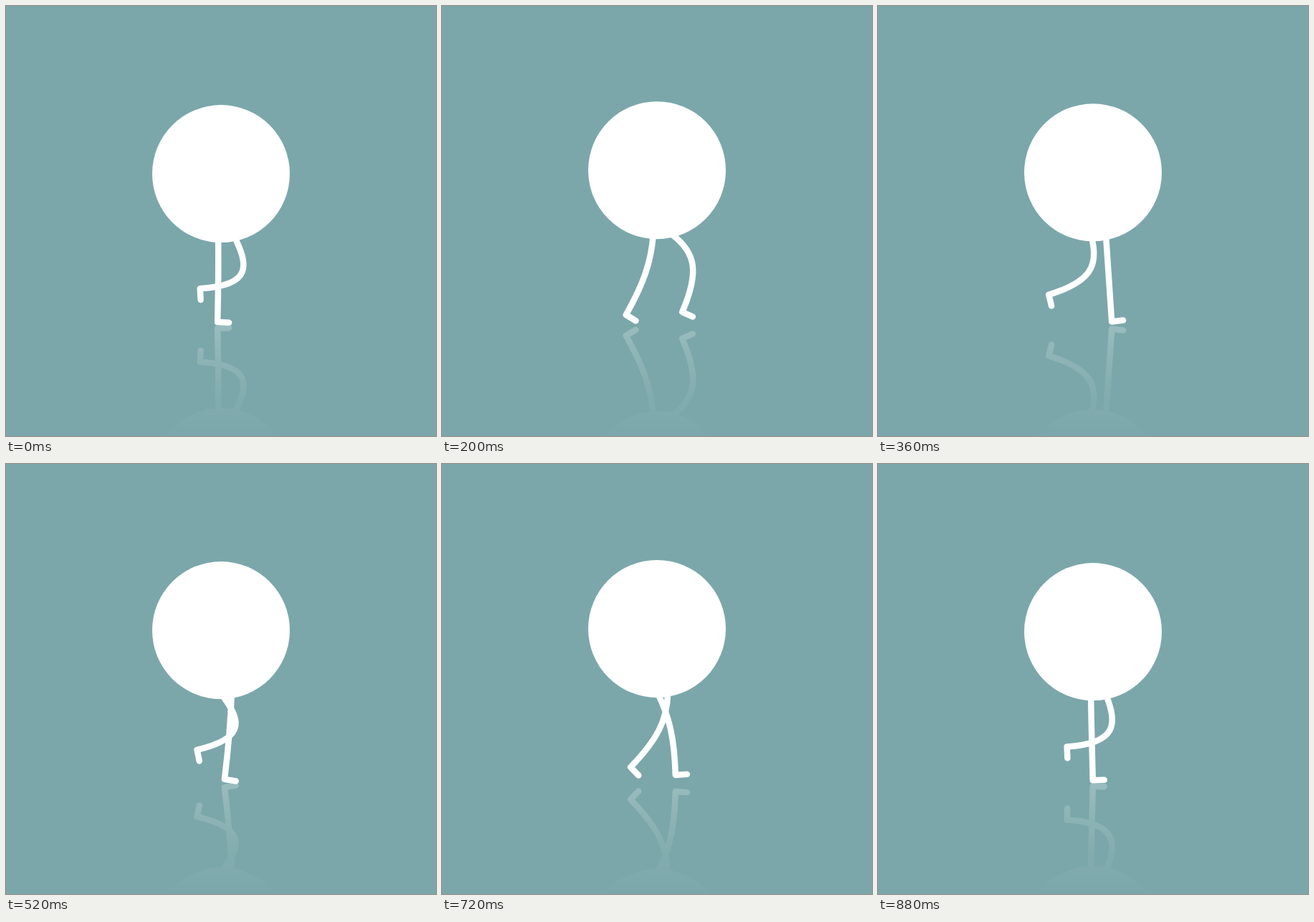
Animation of 600x600 px, one loop 0.92 s. Source, as an HTML page:

```html
<!DOCTYPE html>
<html lang="en">
<head>
<meta charset="utf-8">
<title>Walking ball</title>
<style>
  html, body { margin: 0; width: 100%; height: 100%; overflow: hidden; background: #7ba7aa; }
  svg { display: block; width: 100vw; height: 100vh; }
  path { fill: none; stroke: #fff; stroke-width: 8.5; stroke-linecap: round; stroke-linejoin: round; }
</style>
</head>
<body>
<svg viewBox="0 0 600 600">
  <defs>
    <linearGradient id="fade" gradientUnits="userSpaceOnUse" x1="0" y1="446" x2="0" y2="600">
      <stop offset="0" stop-color="#fff" stop-opacity=".24"/>
      <stop offset=".35" stop-color="#fff" stop-opacity=".13"/>
      <stop offset=".68" stop-color="#fff" stop-opacity=".055"/>
      <stop offset="1" stop-color="#fff" stop-opacity=".01"/>
    </linearGradient>
    <mask id="floor" maskUnits="userSpaceOnUse" x="0" y="445" width="600" height="155" style="mask-type: alpha">
      <rect y="445" width="600" height="155" fill="url(#fade)"/>
    </mask>
  </defs>
  <g id="walker">
    <path id="legA"/>
    <path id="legB"/>
    <circle id="ball" cx="300" cy="234" r="96" fill="#fff"/>
  </g>
  <g mask="url(#floor)">
    <use href="#walker" transform="matrix(1 0 0 -1 0 891)"/>
  </g>
</svg>
<script>
const LOOP = 920, STEP = 40, FOOT = 16;

// One stride, shared by both legs half a loop apart:
// time, ankle x from hip, ankle y, foot angle, knee bow
const stride = [
  [0,    -1, 441,  3,  0.5],  // planted
  [200, -38, 431, 31,  7],    // heel up
  [260, -52, 423, 46, 12],    // push off
  [430, -54, 394, 88, 33.5],  // lifted behind
  [530, -32, 400, 76, 35],    // swing
  [660,  14, 427, 24, 22.7],  // reach
  [720,  25, 434, -4,  7],    // stretch
  [820,   8, 440.5, -7, 0]    // landing
];

// Smooth looping curve through the key points
function sample(keys, t) {
  const n = keys.length;
  const key = i => keys[(i + n) % n];
  const time = i => key(i)[0] + LOOP * Math.floor(i / n);
  let i = n - 1;
  while (keys[i][0] > t) i--;
  const span = time(i + 1) - time(i);
  const u = (t - time(i)) / span;

  const slope = (j, c) => {
    const before = time(j) - time(j - 1), after = time(j + 1) - time(j);
    const sIn = (key(j)[c] - key(j - 1)[c]) / before;
    const sOut = (key(j + 1)[c] - key(j)[c]) / after;
    return (sIn * after + sOut * before) / (before + after);
  };

  return key(i).slice(1).map((a, k) => {
    const b = key(i + 1)[k + 1];
    return a + (b - a) * u * u * (3 - 2 * u)
      + span * u * (1 - u) * ((1 - u) * slope(i, k + 1) - u * slope(i + 1, k + 1));
  });
}

// Cosine with the given period that peaks at the given time
const wave = (t, period, peak) => Math.cos(2 * Math.PI * (t - peak) / period);

function legPath(hipX, hipY, t) {
  const [dx, y, angle, bow] = sample(stride, t % LOOP);
  const dy = y - hipY, len = Math.hypot(dx, dy);
  // Handle at a share of the hip-ankle line, pushed forward from it
  const handle = (share, push) =>
    `${hipX + dx * share + dy / len * push} ${hipY + dy * share - dx / len * push}`;
  const skew = (bow / 45) ** 4;   // a strong bend sits lower
  const c1 = handle(0.33 - 0.003 * bow, bow * (4 / 3 - skew));
  const c2 = handle(0.6 - 0.004 * bow, bow * (4 / 3 + skew));
  const x = hipX + dx, a = angle * Math.PI / 180;
  return `M${hipX} ${hipY}C${c1} ${c2} ${x} ${y}l${FOOT * Math.cos(a)} ${FOOT * Math.sin(a)}`;
}

const get = id => document.getElementById(id);
const ball = get("ball"), legA = get("legA"), legB = get("legB");

function draw(t) {
  const cy = 231.3 + 2.5 * wave(t, LOOP / 2, 430) + 0.5 * wave(t, LOOP / 4, 225);
  const spread = 9.8 + 3.7 * wave(t, LOOP, 145);
  ball.setAttribute("cy", cy);
  legA.setAttribute("d", legPath(308 - spread, cy + 90, t));
  legB.setAttribute("d", legPath(308 + spread, cy + 90, t + LOOP / 2));
}

const start = performance.now();
function tick() {
  const t = (performance.now() - start) % LOOP;
  draw(Math.floor(t / STEP) * STEP);
  requestAnimationFrame(tick);
}
draw(0);
requestAnimationFrame(tick);
</script>
</body>
</html>
```
